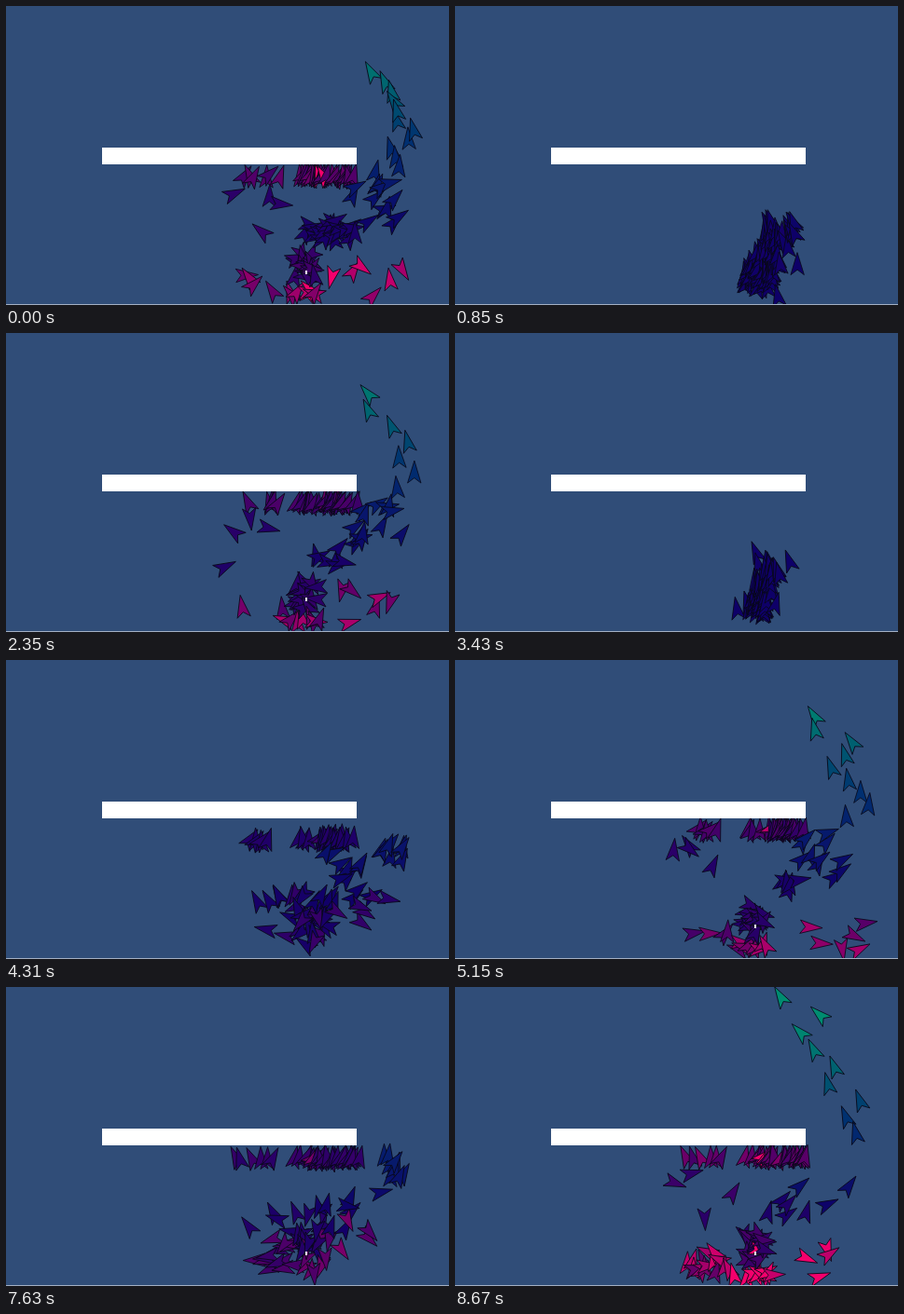
Animation of 475x321 px, one loop 8710 ms. Source, as an HTML page with a canvas:

```html
<!DOCTYPE html>
<html lang="en">
<head>
<meta charset="utf-8">
<title>Evolving swarm</title>
<style>
html, body { margin: 0; width: 100%; height: 100%; overflow: hidden; background: #304d78; }
canvas { display: block; }
</style>
</head>
<body>
<canvas id="stage" width="475" height="321"></canvas>
<script>
const ctx = document.getElementById('stage').getContext('2d');
const LOOP = 8710, STEP = 46.96, LIFE = 2780, FIRST = 380, EARLY = 470, REST = 800;
const RAD = Math.PI / 180;

let seed = 11;
function rnd() {
  seed = (seed + 0x6D2B79F5) | 0;
  let t = Math.imul(seed ^ (seed >>> 15), 1 | seed);
  t = (t + Math.imul(t ^ (t >>> 7), 61 | t)) ^ t;
  return ((t ^ (t >>> 14)) >>> 0) / 4294967296;
}
const lerp = (a, b, k) => a + (b - a) * k;
const jit = r => (rnd() * 2 - 1) * r;
const many = (n, make) => Array.from({ length: n }, (_, i) => make(i));

// Rockets scattered over an ellipse; a negative mood turns pink with age
function crowd(n, x, y, rx, ry, heading, sway, mood, speed = .06) {
  return many(n, () => {
    const th = rnd() * Math.PI * 2, r = Math.sqrt(rnd());
    return { x: x + rx * r * Math.cos(th), y: y + ry * r * Math.sin(th),
             a: heading + jit(sway), mood: mood * lerp(.5, 1, rnd()), speed };
  });
}

// Rockets strung along the bend past the bar's right end
function climbers(n, front) {
  const bend = (p, q, r, u) => p * (1 - u) ** 2 + 2 * q * u * (1 - u) + r * u * u;
  const slope = (p, q, r, u) => (q - p) * (1 - u) + (r - q) * u;
  return many(n, i => {
    const u = front * (1 - .85 * i / n);
    const side = i ? jit(20) + 8 : 0;
    return { x: bend(415, 435, 345, u) + side, y: bend(200, 110, 5, u),
             a: Math.atan2(slope(415, 435, 345, u), -slope(200, 110, 5, u)) / RAD + jit(15),
             mood: 0, speed: .115, high: true };
  });
}

// The young swarm is a plume that leans right as it rises
function plume() {
  const lift = rnd() ** 1.6, loose = rnd() < .07 ? 26 : 0;
  return { x: 323 + 30 * lift + jit(17 + loose), y: 294 - 66 * lift + jit(8 + loose),
           a: -20 * lift + jit(20) };
}

const byX = (p, q) => p.x - q.x;

function breed({ age, front, climb, drift, knot, litter }) {
  const late = [
    climbers(climb, front),
    crowd(30, 343, 182, 35, 2, 8, 20, -.6, 0),
    crowd(6, 268, 182, 30, 2, 10, 40, -.6, 0),
    crowd(2, 345, 181, 25, 2, 0, 60, -1.3, 0),
    crowd(drift, 398, 208, 30, 34, 45, 40, 0),
    crowd(knot, 350, 240, 30, 13, 45, 60, -.1),
    crowd(18, 320, 280, 14, 17, 20, 150, -.35),
    crowd(8, 318, 308, 24, 5, 10, 90, -1.2),
    crowd(litter, 274, 297, 26, 13, 10, 90, -.9),
    crowd(6, 390, 293, 72, 24, 90, 110, -1.3),
    crowd(4, 255, 225, 45, 30, 60, 120, -.3)
  ].flat().sort(byX);
  const early = many(late.length, plume).sort(byX);

  return late.map((end, i) => {
    const e = early[i], { high, speed, mood } = end, stuck = speed === 0;
    const start = { x: 320 + jit(5), y: 288 + jit(8), a: jit(10) };
    const mid = high ? { x: 418 + jit(16), y: 196 + jit(12) }
      : stuck ? { x: end.x + jit(4), y: end.y + 3 }
      : { x: lerp(e.x, end.x, .5) + jit(14), y: Math.max(190, lerp(e.y, end.y, .5) + jit(14)) };
    mid.a = stuck ? end.a : Math.atan2(end.x - e.x, e.y - end.y) / RAD;
    const exit = { x: end.x + Math.sin(end.a * RAD) * speed * REST,
                   y: end.y - Math.cos(end.a * RAD) * speed * REST, a: end.a };
    return { keys: [start, e, mid, end, exit],
             ages: [0, EARLY, (EARLY + age) / 2, age, age + REST], high, mood };
  });
}

const broods = [
  { age: 2400, front: .68, climb: 11, drift: 14, knot: 24, litter: 4 },
  { age: 1970, front: .72, climb: 7, drift: 14, knot: 7, litter: 2 },
  { age: 2000, front: .74, climb: 9, drift: 11, knot: 6, litter: 4 },
  { age: 2740, front: .98, climb: 9, drift: 3, knot: 5, litter: 16 }
].map(breed);

// Smooth value of one property between keys i and i + 1
function curve({ keys, ages }, i, age, prop) {
  const last = keys.length - 1;
  const slope = j => {
    const a = Math.max(0, j - 1), b = Math.min(last, j + 1);
    return (keys[b][prop] - keys[a][prop]) / (ages[b] - ages[a]);
  };
  const h = ages[i + 1] - ages[i], u = (age - ages[i]) / h, v = 1 - u;
  return keys[i][prop] * (1 + 2 * u) * v * v + keys[i + 1][prop] * u * u * (3 - 2 * u)
    + h * u * v * (slope(i) * v - slope(i + 1) * u);
}

function locate(r, age) {
  let i = 0;
  while (i < r.keys.length - 2 && age > r.ages[i + 1]) i++;
  const p = r.keys[i], q = r.keys[i + 1];
  const u = (age - r.ages[i]) / (r.ages[i + 1] - r.ages[i]);
  const turn = ((q.a - p.a + 540) % 360 + 360) % 360 - 180;
  const x = Math.min(466, curve(r, i, age, 'x'));
  let y = Math.min(311, curve(r, i, age, 'y'));
  if (!r.high && x < 386) y = Math.max(y, 178);
  return { x, y, a: p.a + turn * u };
}

// Pink, purple, navy, blue, green
const ramp = [[245, 0, 108], [98, 0, 104], [14, 0, 104], [0, 48, 112], [0, 140, 112]];
function tone(mood, y, age) {
  const c = mood < 0 ? mood * Math.min(1, (age / 2450) ** 2) : Math.max(0, (240 - y) / 200);
  const k = Math.max(0, Math.min(3.999, (c + 1) * 2)), i = Math.floor(k);
  return `rgb(${ramp[i].map((v, j) => Math.round(lerp(v, ramp[i + 1][j], k - i))).join()})`;
}

function arrow({ x, y, a }, fill) {
  ctx.save();
  ctx.translate(x, y);
  ctx.rotate(a * RAD);
  ctx.beginPath();
  ctx.moveTo(0, -12.5);
  ctx.lineTo(7.2, 11.5);
  ctx.lineTo(0, 6);
  ctx.lineTo(-7.2, 11.5);
  ctx.closePath();
  ctx.fillStyle = fill;
  ctx.fill();
  ctx.stroke();
  ctx.restore();
}

function draw(t) {
  const time = t < 30 ? 0 : 30 + Math.floor((t - 30) / STEP + .02) * STEP;
  const n = time < FIRST ? 0 : Math.min(3, 1 + Math.floor((time - FIRST) / LIFE));
  const age = time - FIRST - (n - 1) * LIFE;
  ctx.fillStyle = '#304d78';
  ctx.fillRect(0, 0, 475, 321);
  ctx.strokeStyle = '#080818';
  ctx.lineWidth = .8;
  for (const r of broods[n]) {
    const p = locate(r, age);
    arrow(p, tone(r.mood, p.y, age));
  }
  ctx.fillStyle = '#fff';
  if (age > 1500) ctx.fillRect(321, 284, 2, 4);
  ctx.fillRect(103, 152, 273, 18);
  ctx.fillStyle = '#a4b0c3';
  ctx.fillRect(0, 320, 475, 1);
}

const began = performance.now();
function tick() {
  draw((performance.now() - began) % LOOP);
  requestAnimationFrame(tick);
}
tick();
</script>
</body>
</html>
```
